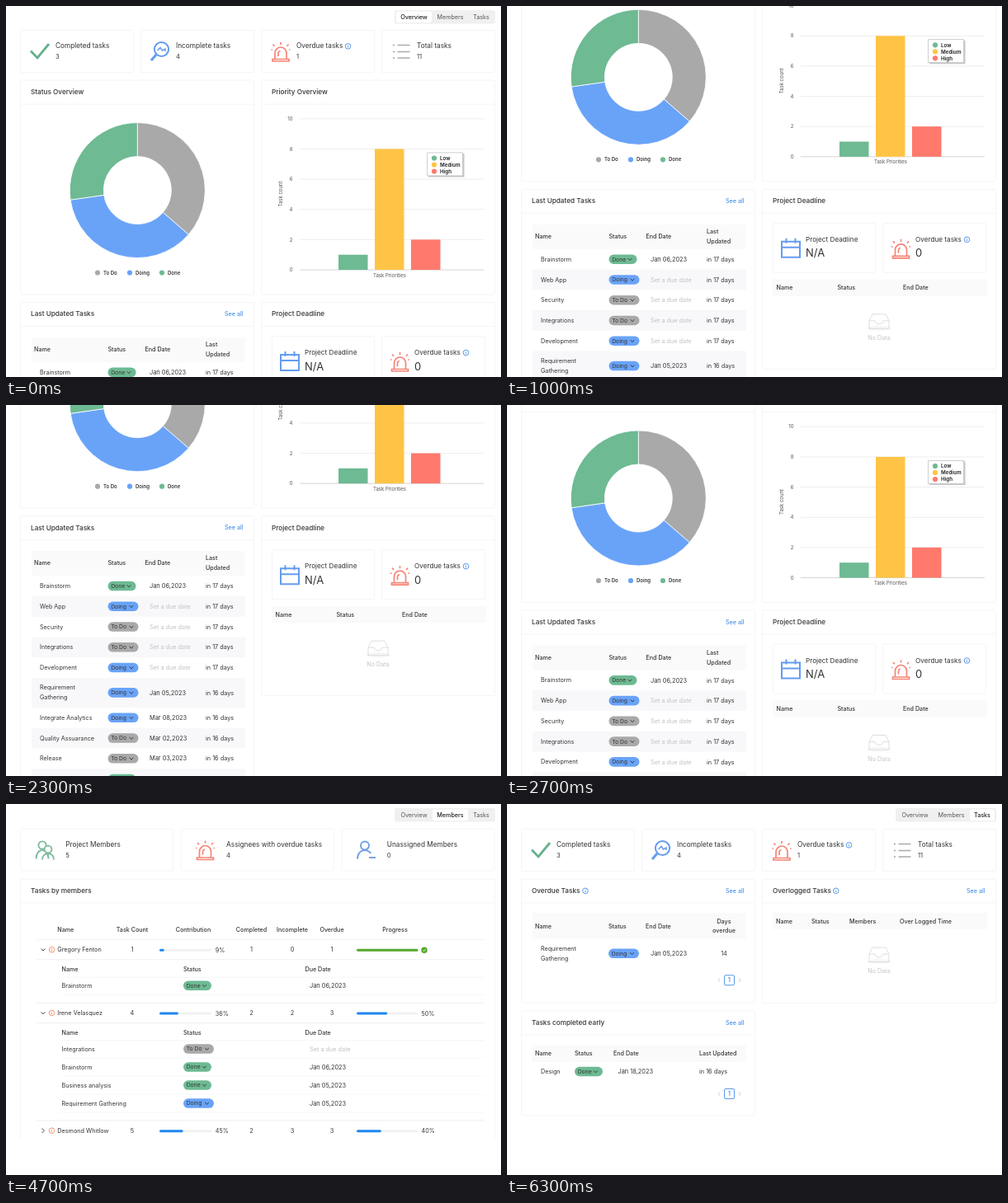
An HTML page that plays this animation: 600 px wide and 450 px high, repeating every 6800 ms.

```html
<!DOCTYPE html>
<html lang="en">
<head>
<meta charset="utf-8">
<title>Project dashboard</title>
<style>
  html, body { margin: 0; width: 100%; height: 100%; overflow: hidden; background: #fff; }
  svg { display: block; }
  text { font-family: Inter, "Open Sans", sans-serif; white-space: pre; }
</style>
</head>
<body>
<svg id="stage" width="600" height="450" viewBox="0 0 600 450"></svg>
<script>
const LOOP = 6800, STEP = 100;
const GREEN = '#6dba93', BLUE = '#69a3f8', GREY = '#a9a9a9', YELLOW = '#ffc445', RED = '#ff796d';
const INK = '#343434', LINK = '#2f80e4', FAINT = '#f1f1f1', SIREN = '#f58576';

// Basic shapes; text is placed by its vertical centre
const text = (x, y, s, size = 7.25, { w = 400, c = INK, a = 'start' } = {}) =>
  `<text x="${x}" y="${y + size * .36}" font-size="${size}" font-weight="${w}" fill="${c}" text-anchor="${a}">${s}</text>`;
const mid = (x, y, s, size, o) => text(x, y, s, size, { ...o, a: 'middle' });
const head = (x, y, s) => text(x, y, s, 7.15, { w: 500 });
const title = (x, y, s) => text(x, y, s, 8.2, { w: 500 });
const rect = (x, y, w, h, fill, extra = '') =>
  `<rect x="${x}" y="${y}" width="${w}" height="${h}" fill="${fill}" ${extra}/>`;
const dot = (x, y, r, fill) => `<circle cx="${x}" cy="${y}" r="${r}" fill="${fill}"/>`;
const path = (d, c, w = 1, extra = '') =>
  `<path d="${d}" fill="none" stroke="${c}" stroke-width="${w}" ${extra}/>`;
const hline = (x1, x2, y, c = FAINT) => path(`M${x1} ${y}H${x2}`, c, .8);
const move = (x, y, s) => `<g transform="translate(${x} ${y})">${s}</g>`;
const box = (x, y, w, h) => rect(x + .5, y + .5, w - 1, h - 1, '#fff', `rx="1.5" stroke="#f3f3f3" stroke-width=".8"`);
const card = (x, y, w, h, name, link) => box(x, y, w, h) + hline(x, x + w, y + 29.5, '#f4f4f4') +
  title(x + 13, y + 14.5, name) + (link ? text(x + 248, y + 14.5, 'See all', 7.2, { c: LINK }) : '');

// Icons
const info = (x, y, c = LINK, r = 3.3) =>
  `<circle cx="${x}" cy="${y}" r="${r}" fill="none" stroke="${c}" stroke-width=".8"/>` +
  path(`M${x} ${y - 1.7}v.8M${x} ${y - .3}v2`, c, .8);
const chevron = (x, y, c = '#333') => path(`M${x - 2.3} ${y - 1.2}l2.3 2.6 2.3 -2.6`, c, .9);
const arrow = (x, y, d = 1, c = '#333', s = 2.5) => path(`M${x - d * s / 2} ${y - s}l${d * s} ${s} ${-d * s} ${s}`, c, .9);
const siren = (x, y) => move(x, y,
  path('M-7 8V1a7 7 0 0 1 14 0V8M-10 8.5H10V11H-10ZM-3 5V1a3 3 0 0 1 2.5 -2.5' +
    'M0 -12v3M-9.5 -9.5l2 2.3M9.5 -9.5l-2 2.3M-11.5 -3h1.5M11.5 -3h-1.5', SIREN, 1.7));
const person = (c, x = 0) => `<circle cx="${x}" cy="-5" r="5" fill="none" stroke="${c}" stroke-width="1.9"/>` +
  path(`M${x - 9} 11c0 -14 18 -14 18 0`, c, 1.9);
const calendar = (x, y) => move(x, y, path('M-11 -8H11V11H-11ZM-11 -1H11M-5.5 -12v6M5.5 -12v6', '#659cf0', 2));
const icons = {
  check: path('M30 54.5l8 8.5 14 -17', '#66b18c', 2.8),
  lens: `<circle cx="188.5" cy="52.5" r="8.6" fill="none" stroke="#659cf0" stroke-width="2"/>` +
    path('M182 59l-6 7', '#659cf0', 3) + path('M183.5 54l3.5 -3.5 2.5 3.5 3.5 -2v3', '#659cf0', 1.5),
  list: [47.5, 55.5, 63].map(y => dot(470, y, 1.1, '#aaa') + path(`M474.5 ${y}H489.5`, '#aaa', 1.5)).join('')
};
const empty = (y) => move(451, y,
  `<ellipse cx="0" cy="8" rx="15" ry="3" fill="#f6f6f6"/>` +
  path('M-12 -1l4 -8H8l4 8V8.5H-12ZM-12 -1h7c0 5 10 5 10 0h7', '#d6d6d6', .8)) +
  mid(451, y + 19.5, 'No Data', 7.2, { c: '#c4c4c4' });

const STATUS = { Done: [GREEN, 34], Doing: [BLUE, 37], 'To Do': [GREY, 37] };
const pill = (x, y, s) => {
  const [c, w] = STATUS[s];
  return rect(x, y - 5.8, w, 11.6, c, 'rx="5.8"') + text(x + 3.7, y, s, 6.8) + chevron(x + w - 8.5, y);
};
const due = (x, y, d) => d ? text(x, y, d, 7.4) : text(x, y, 'Set a due date', 7.3, { c: '#c2c2c2' });
const pager = y => arrow(257, y, -1, '#c4c4c4', 2.2) + arrow(282, y, 1, '#c4c4c4', 2.2) +
  rect(263.5, y - 6, 12, 12, '#fff', `rx="1.5" stroke="${LINK}" stroke-width=".8"`) +
  mid(269.5, y, '1', 7, { c: LINK, w: 500 });

const tabs = active => rect(471, 5, 122, 16.5, '#f0f0f0', 'rx="2.5"') +
  [['Overview', 473, 43], ['Members', 517, 43], ['Tasks', 561, 30]].map(([s, x, w], i) =>
    (i === active ? rect(x, 6.5, w, 13.5, '#fff', 'rx="2"') : '') +
    mid(x + w / 2, 13.2, s, 7.2, { c: i === active ? '#222' : '#555', w: i === active ? 500 : 400 })).join('');

const summary = [['Completed tasks', 3], ['Incomplete tasks', 4], ['Overdue tasks', 1], ['Total tasks', 11]]
  .map(([s, n], i) => box(17 + 146 * i, 29, 138, 52) + text(60 + 146 * i, 48.3, s, 8.25) + text(60 + 146 * i, 61, n, 7.6))
  .join('') + icons.check + icons.lens + siren(333, 56) + icons.list + info(414.5, 48.8);

function donut(cx, cy, R, r) {
  const pt = (a, q) => `${cx + q * Math.sin(a)} ${cy - q * Math.cos(a)}`;
  let from = 0;
  return [[4, GREY], [4, BLUE], [3, GREEN]].map(([n, c]) => {
    const a = from, b = from += n / 11 * 2 * Math.PI;
    return `<path d="M${pt(a, R)}A${R} ${R} 0 0 1 ${pt(b, R)}L${pt(b, r)}A${r} ${r} 0 0 0 ${pt(a, r)}Z" fill="${c}" stroke="#fff" stroke-width=".8"/>`;
  }).join('');
}

function barChart() {
  const y = v => 320 - v * 18.32;
  let s = '';
  for (let v = 0; v <= 10; v += 2)
    s += hline(356, 579, y(v), v ? '#e9e9e9' : '#c9c9c9') + text(347.5, y(v), v, 6, { a: 'end', c: '#555' });
  s += [[1, GREEN], [8, YELLOW], [2, RED]].map(([v, c], i) => rect(403 + 44 * i, y(v), 35.5, 320 - y(v), c)).join('');
  s += mid(465, 326.5, 'Task Priorities', 6, { c: '#555' }) +
    `<g transform="translate(333 228) rotate(-90)">${mid(0, 0, 'Task count', 6, { c: '#555' })}</g>` +
    rect(512, 179, 43.5, 28.5, '#c8c8c8') + rect(510.7, 177.9, 43, 28, '#fff', 'stroke="#bbb" stroke-width=".7"');
  return s + [['Low', GREEN], ['Medium', YELLOW], ['High', RED]].map(([n, c], i) =>
    dot(519, 184.5 + 8 * i, 3.1, c) + text(526, 184.5 + 8 * i, n, 6.2, { w: 700 })).join('');
}

const tasks = [
  ['Brainstorm', 'Done', 'Jan 06,2023', 17], ['Web App', 'Doing', '', 17], ['Security', 'To Do', '', 17],
  ['Integrations', 'To Do', '', 17], ['Development', 'Doing', '', 17],
  ['Requirement|Gathering', 'Doing', 'Jan 05,2023', 16], ['Integrate Analytics', 'Doing', 'Mar 08,2023', 16],
  ['Quality Assuarance', 'To Do', 'Mar 02,2023', 16], ['Release', 'To Do', 'Mar 03,2023', 16],
  ['Design', 'Done', 'Jan 18,2023', 16], ['Business analysis', 'Done', 'Jan 05,2023', 16]
];
const lines = (x, y, s) => s.split('|').map((p, i, all) => text(x, y + (i - (all.length - 1) / 2) * 12, p, 7.2)).join('');

function taskTable() {
  let top = 432;
  return rect(31, 402, 259, 30, '#fafafa') + head(34, 416.5, 'Name') + head(123.5, 416.5, 'Status') +
    head(168.5, 416.5, 'End Date') + head(242, 410.7, 'Last') + head(242, 422.5, 'Updated') +
    tasks.map(([name, status, date, days], i) => {
      const h = name.includes('|') ? 36 : 24.75, y = top + h / 2;
      const bg = i % 2 ? rect(31, top, 259, h, '#f8f8fa') : '';
      top += h;
      return bg + lines(41, y, name) + pill(123.5, y, status) + due(174, y, date) + text(242, y, `in ${days} days`, 7.3);
    }).join('');
}

const overview = tabs(0) + summary +
  card(17, 89.5, 284, 261, 'Status Overview') + donut(159.3, 223.5, 82, 41) +
  [['To Do', GREY, 111], ['Doing', BLUE, 150], ['Done', GREEN, 189]].map(([s, c, x]) =>
    dot(x, 323.5, 3.1, c) + text(x + 7, 323.5, s, 6, { w: 600 })).join('') +
  card(309, 89.5, 284, 261, 'Priority Overview') + barChart() +
  card(17, 359, 284, 368, 'Last Updated Tasks', true) + taskTable() +
  card(309, 359, 284, 219, 'Project Deadline') + box(322, 400, 125, 61) + box(455, 400, 126, 61) +
  calendar(344, 431) + text(362, 420.3, 'Project Deadline', 8.2) + text(362, 437, 'N/A', 13) +
  siren(477.5, 432) + text(495, 420.3, 'Overdue tasks', 8.2) + text(495, 437, '0', 13) + info(557.5, 420.5) +
  rect(322, 469, 260, 20, '#fafafa') + head(326.5, 479, 'Name') + head(400.5, 479, 'Status') + head(480, 479, 'End Date') +
  empty(520);

const tasksView = tabs(2) + move(0, 1, summary) +
  card(17, 90.5, 284, 151, 'Overdue Tasks', true) + info(95, 105.3) +
  rect(31, 132, 259, 32, '#fafafa') + head(34, 148, 'Name') + head(123, 148, 'Status') + head(168, 148, 'End Date') +
  mid(263, 142.3, 'Days', 7.15, { w: 500 }) + mid(263, 153.7, 'overdue', 7.15, { w: 500 }) +
  lines(41, 181.3, 'Requirement|Gathering') + pill(123, 181.3, 'Doing') + due(174, 181.3, 'Jan 05,2023') +
  mid(263, 181.3, '14') + pager(213.7) +
  card(309, 90.5, 284, 151.5, 'Overlogged Tasks', true) + info(398.7, 105.3) +
  rect(322, 132, 260, 20, '#fafafa') + head(326, 142, 'Name') + head(369, 142, 'Status') +
  head(415, 142, 'Members') + head(476, 142, 'Over Logged Time') + empty(183) +
  card(17, 250.5, 284, 128, 'Tasks completed early', true) +
  rect(31, 292, 259, 21, '#fafafa') + head(34, 302.5, 'Name') + head(82, 302.5, 'Status') +
  head(129, 302.5, 'End Date') + head(233, 302.5, 'Last Updated') +
  text(41, 324.5, 'Design', 7.2) + pill(82, 324.5, 'Done') + due(134.5, 324.5, 'Jan 18,2023') +
  text(233, 324.5, 'in 16 days', 7.3) + pager(351.5);

// name, count, contribution, completed, incomplete, overdue, progress, subtasks
const members = [
  ['Gregory Fenton', 1, 9, 1, 0, 1, 100, [['Brainstorm', 'Done', 'Jan 06,2023']]],
  ['Irene Velasquez', 4, 36, 2, 2, 3, 50, [['Integrations', 'To Do', ''], ['Brainstorm', 'Done', 'Jan 06,2023'],
    ['Business analysis', 'Done', 'Jan 05,2023'], ['Requirement Gathering', 'Doing', 'Jan 05,2023']]],
  ['Desmond Whitlow', 5, 45, 2, 3, 3, 40],
  ['Stephen Voigt', 2, 18, 0, 2, 0, 0],
  ['Quentin Barlow', 6, 55, 2, 4, 3, 33]
];
const bar = (x, y, w, pct, c = '#1e88f0') => rect(x, y - 1.5, w, 3, '#f2f2f2', 'rx="1.5"') +
  rect(x, y - 1.5, w * pct / 100, 3, c, 'rx="1.5"');

function subTable(y, rows) {
  return ['Name', 'Status', 'Due Date'].map((s, i) => head([67.5, 215, 362.5][i], y + 23.7, s)).join('') +
    hline(67, 580, y + 33.5, '#f3f3f3') +
    rows.map(([name, status, date], i) => {
      const ry = y + 43.6 + 22 * i;
      return text(67.5, ry, name, 7.2) + pill(215, ry, status) + due(368, ry, date) + hline(67, 580, ry + 11, '#f6f6f6');
    }).join('');
}

function membersView(open) {
  let y = 176.7, rows = '';
  members.forEach(([name, count, share, done, left, late, progress, subs], i) => {
    const isOpen = i < open;
    rows += (isOpen ? chevron(45, y) : arrow(45, y, 1, '#333', 2.8)) + (late ? info(55.5, y, '#ee7a50') : '') +
      text(62.3, y, name, 7.25) +
      [[153, count], [297.5, done], [347, left], [395, late]].map(([x, n]) => mid(x, y, n, 7.4)).join('') +
      bar(186, y + .5, 63.5, share) + text(253.8, y + .5, share + '%', 7.2) +
      bar(425, y + .5, 74.5, progress, progress === 100 ? '#55a82c' : undefined) +
      (progress === 100
        ? dot(507, y + .5, 3.7, '#55a82c') + path(`M505.3 ${y + .5}l1.3 1.4 2.2 -2.6`, '#fff', .8)
        : text(503.5, y + .5, progress + '%', 7.2)) +
      (i < 4 ? hline(37, 580, y + 12, '#ececec') : '');
    if (isOpen) {
      rows += subTable(y, subs);
      y += 30.5 + 22 * subs.length;
      rows += hline(37, 580, y + 12, '#ececec');
    }
    y += 24.25;
  });
  const heads = [[153, 'Task Count'], [227, 'Contribution'], [297.5, 'Completed'], [347, 'Incomplete'], [395, 'Overdue'], [471.5, 'Progress']];
  return tabs(1) +
    [['Project Members', 5, 17, 186], ['Assignees with overdue tasks', 4, 211.8, 186], ['Unassigned Members', 0, 406.5, 186]]
      .map(([s, n, x, w]) => box(x, 29.5, w, 52) + text(x + 55.3, 49, s, 8.25) + text(x + 55.3, 61.8, n, 7.6)).join('') +
    move(44, 55.5, path('M-7.5 11c0 -14 15 -14 15 0', '#7dbb9c', 1.9) +
      `<circle cx="0" cy="-5.5" r="4.6" fill="none" stroke="#7dbb9c" stroke-width="1.9"/>` ) +
    move(51, 56.5, `<circle cx="0" cy="-1.5" r="4.4" fill="#fff" stroke="#7dbb9c" stroke-width="1.9"/>` +
      path('M-7 11c0 -10 14 -10 14 0', '#7dbb9c', 1.9)) +
    siren(241.5, 56.5) + move(435, 55.5, person('#6f9fe8')) + rect(439, 60, 10, 8, '#fff') + path('M440 65H448', '#6f9fe8', 1.9) +
    card(17, 90.5, 576, y - 90.5, 'Tasks by members') + head(62.3, 152.5, 'Name') +
    heads.map(([x, s]) => mid(x, 152.5, s, 7.15, { w: 500 })).join('') + hline(37, 580, 164.3, '#ececec') + rows;
}

// Linear interpolation through [time, value] points
function track(t, keys) {
  for (let i = 1; i < keys.length; i++) {
    const [t0, a] = keys[i - 1], [t1, b] = keys[i];
    if (t < t1) return t <= t0 ? a : a + (b - a) * (t - t0) / (t1 - t0);
  }
  return keys[keys.length - 1][1];
}

function view(t) {
  if (t < 3200) return move(0, -track(t, [[100, 0], [1950, 282], [2100, 282], [2700, 110.5], [3050, 0]]), overview);
  if (t >= 5800) return tasksView;
  const open = t < 4100 ? 0 : t < 4700 ? 1 : 2;
  const scroll = track(t, [[4900, 0], [5200, 29], [5500, 29], [5700, 0]]);
  return `<svg width="600" height="${open > 1 ? 406 : 450}">${move(0, -scroll, membersView(open))}</svg>`;
}

const stage = document.getElementById('stage');
let shown = -1;
function draw(now) {
  const t = Math.floor(now % LOOP / STEP) * STEP;
  if (t !== shown) stage.innerHTML = view(shown = t);
  requestAnimationFrame(draw);
}
draw(0);
</script>
</body>
</html>
```
